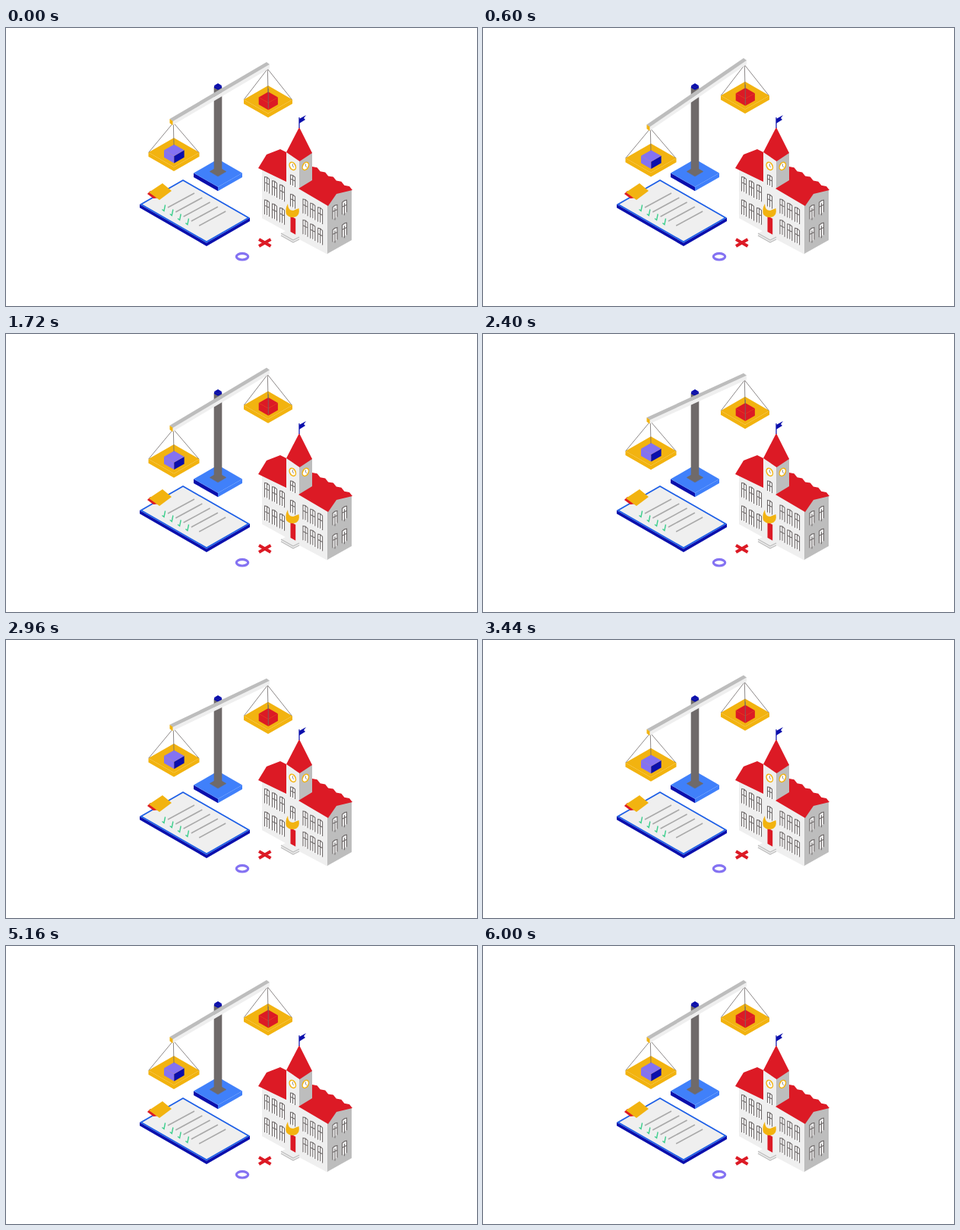
Animation, 620 px wide and 367 px high, one loop 6.04 s. Source, as an HTML page:

```html
<!DOCTYPE html>
<html lang="en">
<head>
<meta charset="utf-8">
<title>Scales and school</title>
<style>
  html, body { margin: 0; width: 100%; height: 100%; overflow: hidden; background: #fff; }
  svg { display: block; width: 620px; height: 367px; }
</style>
</head>
<body>
<svg id="stage" viewBox="0 0 620 367"></svg>
<script>
const LOOP = 6040;
const K = .575; // slope of the isometric axes
const C = {
  light: '#efefef', shade: '#bdbdbd', dark: '#6f6a6a', line: '#a9a9a9',
  red: '#dc1a25', yellow: '#f2b310', blue: '#4080fa', edge: '#1c5ee6',
  navy: '#0b0fac', purple: '#8472f2', green: '#3ecf8e'
};
const stage = document.getElementById('stage');

function add(tag, attrs, parent = stage) {
  const el = document.createElementNS('http://www.w3.org/2000/svg', tag);
  for (const key in attrs) el.setAttribute(key, attrs[key]);
  parent.appendChild(el);
  return el;
}
const fillPath = (d, fill, parent) => add('path', { d, fill }, parent);
const strokePath = (d, stroke, width = 1, parent) =>
  add('path', { d, stroke, 'stroke-width': width, fill: 'none' }, parent);

// Upright parallelogram; slope is the fall per pixel to the right.
const wallPath = (x, y, w, h, slope) => `M${x} ${y}l${w} ${w * slope}v${h}l${-w} ${-w * slope}Z`;
const wall = (x, y, w, h, slope, fill, parent) => fillPath(wallPath(x, y, w, h, slope), fill, parent);

// Isometric block: (x, y) is the back corner, u runs right, v runs left.
function block(x, y, u, v, h, top, left, right, parent) {
  wall(x - v, y + v * K, u, h, K, left, parent);
  wall(x + u - v, y + (u + v) * K, v, h, -K, right, parent);
  fillPath(`M${x} ${y}l${u} ${u * K}l${-v} ${v * K}l${-u} ${-u * K}Z`, top, parent);
}

function drawClipboard() {
  block(233, 200, 88, 57, 4.5, C.edge, C.navy, C.navy);
  block(233, 202, 84.5, 53.5, 0, C.light, C.light, C.light);
  fillPath('M186 219l4 -4l13 9l-9 1Z', C.red);
  fillPath('M188 217L206 205L218 215L202 227Z', C.yellow);
  for (let i = 0; i < 5; i++) {
    const x = 208 + i * 10.3, y = 239 + i * 6;
    strokePath(`M${x + 5} ${y - 2}l35 -19`, C.line, 1.6);
    if (i < 4) strokePath(`M${x - 2.5} ${y + .5}l2.5 2l1.6 -8`, C.green, 1.4);
  }
}

function drawStand() {
  block(279, 173, 32, 32, 5.5, C.blue, C.navy, C.blue);
  block(279, 183, 11, 11, .5, C.dark, C.dark, C.dark);
  block(279, 75, 5.3, 5.3, 113, C.dark, C.dark, C.dark);
  block(279, 73, 5, 5, 3, C.navy, C.navy, C.navy);
}

function drawWindow(x, y, slope, h = 19, fill = '#fff') {
  const w = 6, left = x - w / 2, top = y - h / 2 - slope * w / 2;
  wall(left, top, w, h, slope, fill);
  strokePath(`M${left} ${top + h}V${top}l${w / 2} ${slope * w / 2 - 1}L${left + w} ${top + slope * w}v${h}` +
    `M${x} ${top + 1}v${h}M${left} ${top + h * .38}l${w} ${slope * w}`, C.dark, 1.1);
}

function drawWindows(x, rows, count, dx, slope, h, fill) {
  for (const y of rows) {
    for (let i = 0; i < count; i++) drawWindow(x + i * dx, y + i * dx * slope, slope, h, fill);
  }
}

function drawClock(x, tilt) {
  const y = 182.3;
  add('ellipse', { cx: x, cy: y, rx: 3.7, ry: 5.4, fill: '#fff', stroke: C.yellow,
    'stroke-width': 1.5, transform: `rotate(${tilt} ${x} ${y})` });
  strokePath(`M${x} ${y - 3}v3l1.8 1.5`, C.dark, .8);
}

function drawSchool() {
  wall(337, 186, 33, 65, .55, C.light);
  fillPath('M332 185L343 167L361 160L371 165V204Z', C.red);
  wall(369, 163, 17, 107, .59, C.light);
  wall(386, 173, 17, 40, -.55, C.shade);
  fillPath('M386 131L403 165L386.5 176L369 164Z', C.red);
  strokePath('M386 132V118', C.navy, 1.2);
  fillPath('M386 120L395 115L392 119L394 121L386 126Z', C.navy);

  wall(386, 211, 37.5, 68, .53, C.light);
  fillPath('M423 234L435 217L455 213V280L423 298Z', C.shade);
  const ridge = 'l6.6 1.2l4 5'.repeat(5);
  fillPath(`M403 183${ridge}L435 219L424 235L385 212L403 201Z`, C.red);

  drawWindows(343.5, [207.5, 238], 3, 10, .53);
  drawWindows(394, [237, 264.5], 3, 9.8, .55);
  drawWindows(433, [243, 273], 2, 12.5, -.5, 16, C.light);
  drawWindow(377.5, 202, .5, 13);
  drawWindow(377.5, 229, .5, 16);
  drawClock(377.3, -28);
  drawClock(394.3, 28);

  wall(374.5, 248, 6.7, 21, .55, C.red);
  fillPath('M371 232Q371 241 378 241L385.5 238Q387 246 382 249Q374 252 369 246Q367 239 371 232Z', C.yellow);
  fillPath('M362 271L370 267L386 276V279L378 283L362 274Z', C.light);
  for (const y of [271, 274]) strokePath(`M362 ${y}l16 9l8 -4`, C.shade, 1.3);
}

function drawMarks() {
  strokePath('M333 279l15.5 9m0 -9l-15.5 9', C.red, 4);
  add('ellipse', { cx: 311, cy: 301.8, rx: 7.7, ry: 4.2, fill: 'none', stroke: C.purple, 'stroke-width': 3.2 });
}

// A hanging plate with a cube; (x, y) is the hook.
function drawPan(x, y, size, depth, cube, colors) {
  const g = add('g', {}), back = y + depth;
  block(x + .7, back, size, size, 5.5, C.yellow, C.yellow, C.yellow, g);
  const cubeTop = back + size * K - cube * K - 3;
  block(x + 1, cubeTop, cube, cube, 9.5, ...colors, g);
  const rim = back + size * K - y;
  strokePath(`M${x - size + 1} ${y + rim}L${x} ${y}L${x + size} ${y + rim}M${x} ${y}L${x + .7} ${cubeTop + 1}`,
    C.dark, .8, g);
  return g;
}

drawClipboard();
drawSchool();
drawMarks();
drawStand();
const leftPan = drawPan(220.3, 125, 33.5, 20, 13.3, [C.purple, C.purple, C.navy]);
const rightPan = drawPan(344.3, 54, 32, 22, 12.6, [C.red, C.red, C.red]);
strokePath('M345.3 80V106', C.dark, .8, rightPan);
const beamFront = fillPath('', C.light), beamTop = fillPath('', C.shade), beamEnd = fillPath('', C.yellow);

// Drop of the left pan in pixels: a swing that dies out.
const swing = [[0, 0], [1000, 9.3], [2560, -10.3], [4110, 3], [5150, 0]];
function dropAt(t) {
  const i = swing.findIndex(([time]) => time > t);
  if (i < 0) return 0;
  const [t0, a] = swing[i - 1], [t1, b] = swing[i];
  const p = (t - t0) / (t1 - t0);
  const eased = i === 1 ? Math.sin(p * Math.PI / 2) : (1 - Math.cos(p * Math.PI)) / 2;
  return a + (b - a) * eased;
}

function render(t) {
  const drop = dropAt(t), rise = -.7 * drop;
  leftPan.setAttribute('transform', `translate(0 ${drop})`);
  rightPan.setAttribute('transform', `translate(0 ${rise})`);
  const left = 120 + drop, right = 45 + rise;
  const slope = (right - left) / 127.5;
  beamTop.setAttribute('d', `M215.5 ${left}L343 ${right}l4 3L219 ${left + 3.5}Z`);
  beamFront.setAttribute('d', wallPath(219, left + 3, 128, 5.5, slope));
  beamEnd.setAttribute('d', wallPath(215.5, left, 4, 5.5, .75));
}

const start = performance.now();
function tick() {
  render((performance.now() - start) % LOOP);
  requestAnimationFrame(tick);
}
tick();
</script>
</body>
</html>
```
